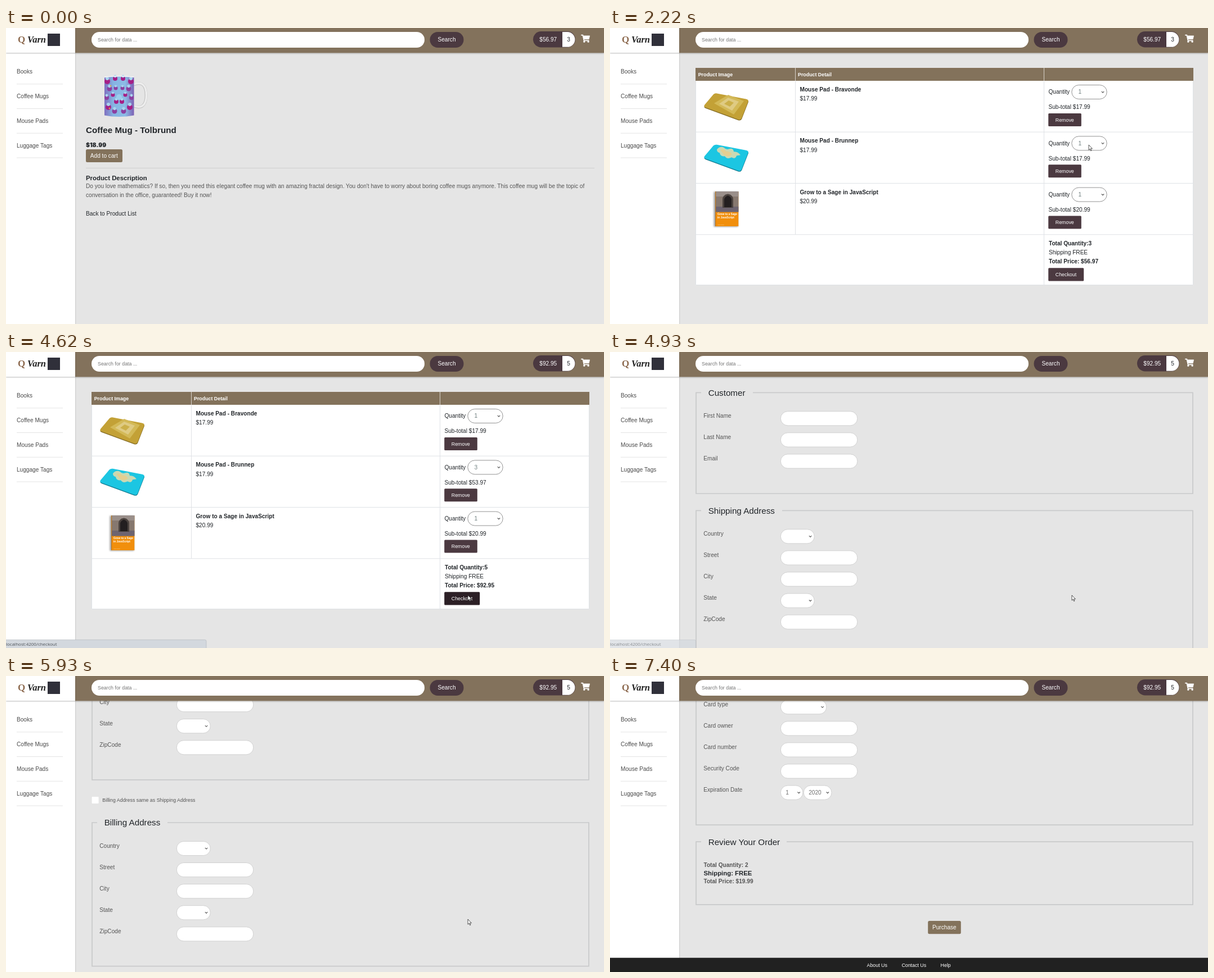
An HTML page that plays this animation: 1063 px wide and 527 px high, repeating every 7.94 s.

```html
<!DOCTYPE html>
<html lang="en">
<head>
<meta charset="utf-8">
<title>Shop checkout</title>
<style>
html, body { margin: 0; width: 100%; height: 100%; overflow: hidden; background: #e5e5e5 }
svg { display: block; width: 1063px; height: 527px; font-family: "Liberation Sans", Arial, sans-serif }
text { white-space: pre }
</style>
</head>
<body>
<script>
const LOOP = 7940, STEP = 77.3;
const BROWN = '#83725b', DARK = '#4b3940', INK = '#212529', GREY = '#555';
const BODY = 10.12, SMALL = 8.86, MID = 11.39, BIG = 15.19;

// Drawing helpers
const text = (x, y, s, fill = INK, size = BODY, more = '') =>
  `<text x="${x}" y="${y}" font-size="${size}" fill="${fill}" ${more}>${s}</text>`;
const bold = (x, y, s, fill = INK, size = BODY, more = '') =>
  text(x, y, s, fill, size, 'font-weight="700" ' + more);
const rect = (x, y, w, h, fill, r = 0, more = '') =>
  `<rect x="${x}" y="${y}" width="${w}" height="${h}" rx="${r}" fill="${fill}" ${more}/>`;
const path = (d, fill, more = '') => `<path d="${d}" fill="${fill}" ${more}/>`;
const circle = (x, y, r, fill) => `<circle cx="${x}" cy="${y}" r="${r}" fill="${fill}"/>`;
const line = (d, stroke, w = 1, more = '') => path(d, 'none', `stroke="${stroke}" stroke-width="${w}" ${more}`);
const group = (id, s, more = '') => `<g id="${id}" ${more}>${s}</g>`;
const chevron = (x, y) => line(`M${x - 2.2} ${y - 1.1}l2.2 2.2 2.2-2.2`, '#555', 1.1);

function sidebar() {
  const items = ['Books', 'Coffee Mugs', 'Mouse Pads', 'Luggage Tags'];
  return rect(0, 0, 123, 527, '#fff', 0, 'filter="url(#soft)"') +
    items.map((s, i) => text(19, 81.2 + i * 43.8, s, '#4a4a4a') +
      line(`M19 ${99.8 + i * 43.75}H101`, '#e4e4e4')).join('');
}

function header() {
  return rect(123, 0, 940, 44.3, BROWN, 0, 'filter="url(#soft)"') +
    rect(0, 0, 123, 44, '#fff', 0, 'filter="url(#soft)"') +
    text(21, 26, 'Q', '#8d6a4f', 17, 'font-weight="700" font-family="Liberation Serif, serif"') +
    text(38, 26, 'Varn', '#222', 16.5, 'font-weight="700" font-style="italic" font-family="Liberation Serif, serif"') +
    rect(74, 10, 22, 22, '#30303a') +
    rect(152, 7, 592, 28, '#fff', 14) + text(163, 23.8, 'Search for data ...', '#757575', SMALL) +
    rect(753.5, 7, 60, 28, DARK, 14) + text(767.5, 24, 'Search', '#fff') +
    rect(937, 6, 75, 28.5, DARK, 14.2) +
    path('M989 7h9a13.2 13.2 0 0 1 0 26.8h-9z', '#fff') +
    text(948.3, 24, '$56.97', '#fff', BODY, 'id="price"') + text(997.2, 24, '3', INK, BODY, 'id="count"') +
    `<g transform="translate(1022 11.7)">` +
    line('M.8.9h2.5l2.2 9.7h8.3', '#fff', 1.7, 'stroke-linecap="round"') +
    path('M3.8 1.8h11.6q.7 0 .5.8l-1.3 5.4q-.1.6-.8.6H5.3z', '#fff') +
    circle(5.8, 12.6, 1.6, '#fff') + circle(13.1, 12.6, 1.6, '#fff') + '</g>';
}

function mug() {
  const spots = [[180, 95, 5], [184, 108, 4.5], [194, 90, 4], [179, 124, 4], [190, 119, 3.5],
    [195, 107, 3.5], [182, 141, 5], [193, 148, 4.5], [196, 131, 4]];
  return line('M227 101C243 94 249 104 249 120S242 145 227 139', '#c4c4c4', 5) +
    line('M227 100.5C243 93.5 249.5 104 249.5 120S242 144.5 227 138.5', '#ededed', 3.4) +
    path('M175 87.5Q201 84 227.5 87.5V155.5Q201 160.5 175 155.5z', 'url(#mug)') +
    spots.map(([x, y, r], i) => [x, 402 - x].map(cx =>
      circle(cx, y, r, i % 2 ? '#8c3fa0' : '#a51f86') +
      circle(cx, y - r, r * .6, '#a9d4ee')).join('')).join('') +
    circle(201, 123, 5, '#9bcdec') + circle(186, 103, 1.3, '#e4a43a') + circle(184, 143, 1.3, '#e4a43a') +
    line('M175 87.5Q201 84 227.5 87.5', '#f4f4f8', 1.6);
}

function productPage() {
  return mug() +
    bold(142, 186.6, 'Coffee Mug - Tolbrund', INK, BIG) +
    text(142, 211.6, '$18.99', INK, 10.4, 'font-weight="900" font-family="Inter, sans-serif"') +
    rect(142, 216, 65, 23, BROWN, 2.5) + text(149.8, 230.7, 'Add to cart', '#fff') +
    line('M142 249.4H1046', '#cfcfcf') +
    bold(142, 270.6, 'Product Description', INK, MID) +
    text(142, 284.7, "Do you love mathematics? If so, then you need this elegant coffee mug with an amazing fractal design. You don't have to worry about boring coffee mugs anymore. This coffee mug will be the topic of", GREY) +
    text(142, 301, 'conversation in the office, guaranteed! Buy it now!', GREY) +
    text(142, 333.8, 'Back to Product List', INK);
}

function pad(dy, color, edge, art) {
  const d = 'M190 116.5L242 126.5Q247 127.5 245.5 131L234 160.5Q232 164.5 227 162.5L170 141.5Q166 140 168 137L184 118Q186.500 115.800 190 116.500z';
  return `<g transform="translate(0 ${dy})">` +
    path(d, edge, 'transform="translate(.2 1.4)"') + path(d, color) + art + '</g>';
}

function book() {
  return rect(184.5, 291.5, 43, 62.5, '#555', 1, 'opacity=".55" filter="url(#blur)"') +
    rect(187, 291, 41.3, 62, '#f18f0c') + rect(187, 291, 41.3, 36.5, '#86786f') +
    rect(187, 291, 41.3, 9, '#9a8f8a') + rect(187, 318, 41.3, 9.5, '#6d6470') +
    path('M200 320V304Q201 297 209.500 295.500Q218 297 219 304V320z', '#4a423e') +
    path('M203 319V305Q204 300 209.500 298.500Q215 300 216 305V319z', '#231f20') +
    rect(187, 291, 1.2, 62, '#b9741d') +
    bold(191, 333.4, 'Grow to a Sage', '#fff', 4.8) + bold(191, 339, 'in JavaScript', '#fff', 4.8) +
    text(191.5, 351, 'Web Series', '#fbe3c0', 2.2);
}

function cartPage() {
  const goods = [['Mouse Pad - Bravonde', '$17.99'], ['Mouse Pad - Brunnep', '$17.99'],
    ['Grow to a Sage in JavaScript', '$20.99']];
  const rows = goods.map(([name, cost], i) => {
    const y = 91.3 * i;
    return bold(337.5, 112.9 + y, name) + text(337.5, 129.2 + y, cost) +
      text(779.5, 117.4 + y, 'Quantity') +
      rect(820.8, 101.5 + y, 62.4, 25, '#fff', 12.5, 'stroke="#777" stroke-width=".8"') +
      text(832.6, 117.4 + y, '1', '#708080', BODY, `id="qty${i}"`) + chevron(876, 114 + y) +
      text(779.5, 144.3 + y, 'Sub-total ' + cost, INK, BODY, `id="sub${i}"`) +
      rect(779.2, 152, 58.600, 23, DARK, 1.5, `transform="translate(0 ${y})"`) +
      text(791.8, 166.8 + y, 'Remove', '#fff', SMALL);
  }).join('');
  const gold = path('M185 134L210 119 238 130 220 154z', '#d3b957') +
    path('M194 135L210 124 229 131 217 147z', '#dfcb83') + path('M203 135l8-6 9 4-7 7z', '#ccb04a');
  const cream = path('M190 125q6-7 13-3 3 4 9 2 7-2 8 5 7-1 12 6l-7 1q-2 7-9 3-8 4-12-2-8 1-9-6-5-1-5-6z', '#c9d9b4') +
    path('M196 126q7-3 10 2 8 0 11 6l-6 3q-9 0-11-6z', '#e4cf91');
  return rect(152, 71, 885, 387, '#fff') + rect(152, 71, 885, 23, BROWN) +
    line('M329.500 71V94M771.500 71V94', '#d8d2ca') +
    line('M152.500 94V457.500H1036.500V94M152 185.200H1037M152 276.500H1037M152 367.800H1037M329.500 94V368M771.500 94V458', '#dfe2e6') +
    bold(156.7, 85.700, 'Product Image', '#fff', SMALL) + bold(334, 85.7, 'Product Detail', '#fff', SMALL) +
    pad(0, '#c3a136', '#856d25', gold) + pad(91.3, '#1cc6e2', '#127d92', cream) + book() + rows +
    bold(780, 387, 'Total Quantity:3', INK, BODY, 'id="totalQty"') +
    text(780, 403.2, 'Shipping FREE') +
    bold(780, 419.4, 'Total Price: $56.97', INK, BODY, 'id="totalPrice"') +
    rect(779.2, 427.3, 63, 23.2, DARK, 1.5, 'id="checkout"') + text(791.8, 442, 'Checkout', '#fff', SMALL);
}

function dropdown() {
  return rect(821, 219, 62, 44, '#fff', 0, 'stroke="#888" stroke-width=".7" filter="url(#soft)"') +
    rect(821.4, 219.4, 61.200, 14.4, '#1a73d9', 0, 'id="mark"') +
    [1, 2, 3].map((n, i) => text(832.6, 230.2 + i * 14.4, n, '#555', BODY, `id="opt${i}"`)).join('');
}

// Checkout form: each field is [label, kind]
const field = (x, y, w) => rect(x, y - 12.6, w, 25.2, '#fff', 12.6, 'stroke="#cdcdcd" stroke-width=".9"');
const select = (x, y, w, s = '') => field(x, y, w) + text(x + 9, y + 3.6, s, '#6f6f6f') + chevron(x + w - 7.2, y);

function fieldset(top, bottom, title, gapEnd, rows = []) {
  return line(`M162 ${top}H153V${bottom}H1036V${top}H${gapEnd}`, '#c9cacb', 1.7) +
    text(174.7, top + 5.3, title, INK, BIG) +
    rows.map(([label, kind], i) => {
      const y = top + 41 + i * 38.1, mid = y + 5;
      return text(166.300, y + 3.6, label, GREY) +
        (kind === 'date' ? select(303.3, mid, 39.6, '1') + select(344.2, mid, 49.8, '2020')
          : kind ? select(303.3, mid, kind) : field(303.3, mid, 136.5));
    }).join('');
}

function checkoutPage() {
  const address = [['Country', 60], ['Street'], ['City'], ['State', 60], ['ZipCode']];
  return fieldset(72.3, 252, 'Customer', 254, [['First Name'], ['Last Name'], ['Email']]) +
    fieldset(282.3, 538.2, 'Shipping Address', 306, address) +
    rect(152.6, 568.3, 12, 12, '#fff', 1) +
    text(171.3, 577.4, 'Billing Address same as Shipping Address', GREY, SMALL) +
    fieldset(614.4, 870, 'Billing Address', 287, address) +
    fieldset(900.2, 1156.2, 'Credit Card', 265, [['Card type', 81.5], ['Card owner'],
      ['Card number'], ['Security Code'], ['Expiration Date', 'date']]) +
    fieldset(1186.2, 1298.2, 'Review Your Order', 314) +
    bold(166.5, 1230.5, 'Total Quantity: 2', GREY) +
    bold(166.5, 1246.2, 'Shipping: FREE', INK, MID) +
    bold(166.5, 1260.4, 'Total Price: $19.99', GREY) +
    rect(565.2, 1327, 58.6, 23.3, BROWN, 2.5) + text(573, 1342, 'Purchase', '#fff');
}

const footer = () => rect(0, 1392.7, 1063, 30, '#212121') +
  [['About Us', 456.5], ['Contact Us', 518.4], ['Help', 587.6]]
    .map(([s, x]) => text(x, 1409, s, '#fff', SMALL)).join('');

document.body.innerHTML = `<svg viewBox="0 0 1063 527"><defs>
  <linearGradient id="mug"><stop offset="0" stop-color="#7e6fc0"/><stop offset=".3" stop-color="#86b4e2"/>
    <stop offset=".7" stop-color="#8cbce6"/><stop offset="1" stop-color="#7c5fb4"/></linearGradient>
  <filter id="soft" x="-20%" y="-20%" width="140%" height="150%"><feDropShadow dx="0" dy="1" stdDeviation="1.3" flood-opacity=".28"/></filter>
  <filter id="blur" x="-20%" y="-20%" width="140%" height="140%"><feGaussianBlur stdDeviation="1.6"/></filter></defs>` +
  rect(0, 0, 1063, 527, '#e5e5e5') +
  group('product', productPage()) + group('cart', cartPage()) + group('form', checkoutPage()) +
  sidebar() + group('foot', footer()) + header() + group('list', dropdown()) +
  group('status', rect(-4, 512.4, 360, 20, '#d3d8de', 2.5, 'id="bubble" stroke="#b4b9c0" stroke-width=".7"') +
    text(0, 523, '', '#4c5157', 8, 'id="link" font-family="Open Sans, sans-serif"')) +
  group('cursor', path('M0 0V9.200L2.100 7.300 3.600 10.700 5 10.100 3.500 6.800H6.400z', '#fff', 'stroke="#111" stroke-width=".7"')) +
  '</svg>';

const el = {};
document.querySelectorAll('[id]').forEach(e => el[e.id] = e);
const show = (e, on) => e.style.display = on ? '' : 'none';
const set = (id, s) => { if (el[id].textContent !== s) el[id].textContent = s; };
const move = (e, x, y) => e.setAttribute('transform', `translate(${x} ${y})`);

// Tracks: [time, ...values]
const pointer = [[130, 988, 434], [748, 969, 15], [825, 969, 15], [903, 1003, 6], [980, 1028, 14],
  [1212, 1028, 14], [2062, 847, 200], [2217, 851, 208], [2526, 851, 208], [2905, 847, 251],
  [3453, 847, 251], [4300, 821, 433], [7088, 821, 433], [7322, 948, 510]];
const scroll = [[5463, 0], [5541, 37], [5927, 353], [6155, 540], [6546, 540], [6623, 581.5], [6925, 891]];
const smooth = k => k * k * (3 - 2 * k);

function at(track, t, ease = k => k) {
  const i = track.findIndex(p => p[0] > t);
  if (i < 1) return track.at(i).slice(1);
  const a = track[i - 1], b = track[i], k = ease((t - a[0]) / (b[0] - a[0]));
  return a.slice(1).map((v, j) => v + (b[j + 1] - v) * k);
}

function draw(t) {
  const q = 130 + Math.floor((t - 124) / STEP) * STEP;
  const onCart = t >= 1130 && t < 4700, updated = t >= 3220;
  const [x, y] = at(pointer, q, smooth);
  const [top] = at(scroll, q);

  show(el.product, t < 1130);
  show(el.cart, onCart);
  show(el.form, t >= 4700);
  show(el.foot, t >= 4700);
  move(el.form, 0, -top);
  move(el.foot, 0, -top);

  set('price', updated ? '$92.95' : '$56.97');
  set('count', updated ? '5' : '3');
  set('qty1', t >= 3140 ? '3' : '1');
  set('sub1', 'Sub-total ' + (updated ? '$53.97' : '$17.99'));
  set('totalQty', 'Total Quantity:' + (updated ? 5 : 3));
  set('totalPrice', 'Total Price: ' + (updated ? '$92.95' : '$56.97'));
  el.checkout.setAttribute('fill', y > 427 ? '#2c2026' : DARK);

  show(el.list, t >= 2370 && t < 3140);
  const pick = Math.max(0, Math.min(2, Math.floor((y - 219) / 14.4)));
  move(el.mark, 0, pick * 14.4);
  for (let i = 0; i < 3; i++) el['opt' + i].setAttribute('fill', i === pick ? '#fff' : '#555');

  // The link bubble shows on hover, shrinks on navigation, then fades
  const [from, turn, fade, name] = t < 3000 ? [980, 1130, 1290, 'cart-details'] : [4390, 4700, 4930, 'checkout'];
  const dim = t < fade ? 1 : 1 - (Math.floor((t - fade) / 70) + 1) / 3;
  show(el.status, t >= from && dim > 0.01);
  el.status.setAttribute('opacity', Math.max(0, dim));
  el.bubble.setAttribute('width', t < turn ? 360 : 156.5);
  set('link', 'localhost:4200/' + name);

  show(el.cursor, t >= 130 && t < 7400);
  move(el.cursor, x, y);
}

let start;
function tick(now) {
  start ??= now;
  draw((now - start) % LOOP);
  requestAnimationFrame(tick);
}
draw(0);
requestAnimationFrame(tick);
</script>
</body>
</html>
```
